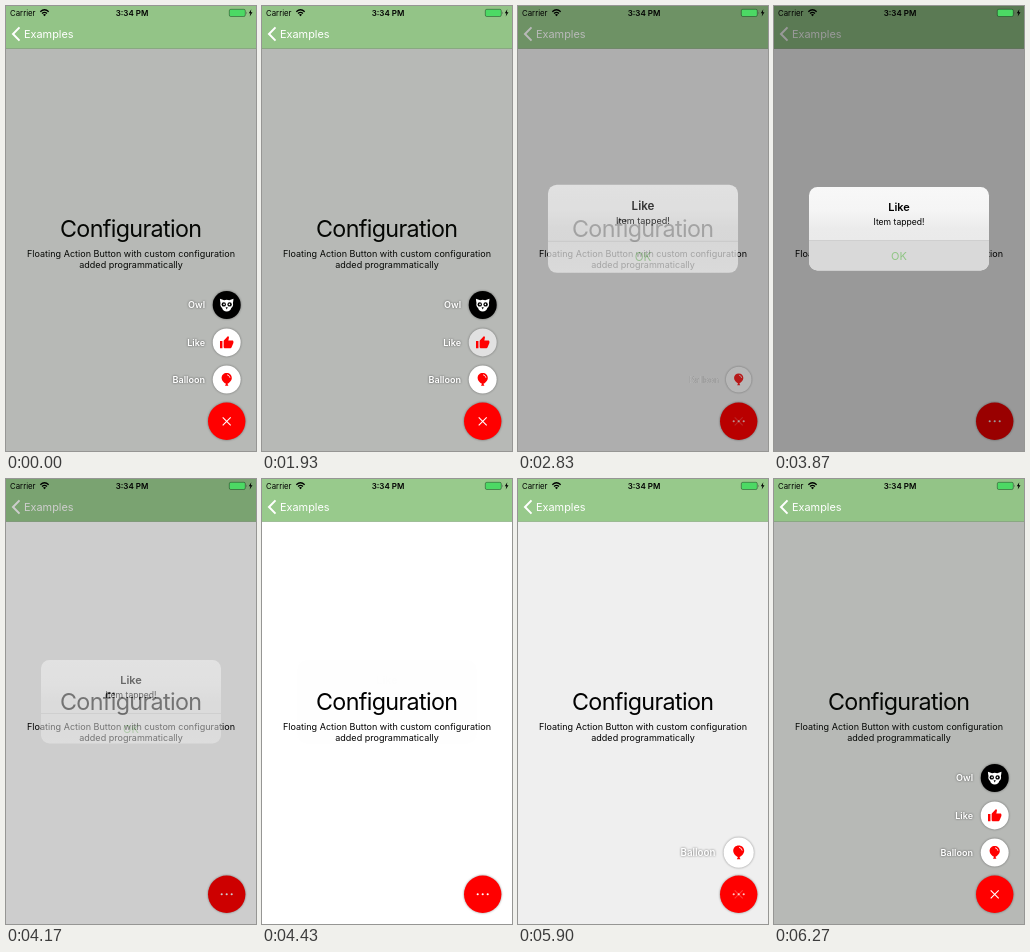
These frames come from a looping animation (250x445 px, 6.33 s). An HTML page:

```html
<!DOCTYPE html>
<html lang="en">
<head>
<meta charset="utf-8">
<title>Floating action button</title>
<style>
  html, body { margin: 0; width: 100%; height: 100%; overflow: hidden; background: #fff; }
  svg { display: block; width: 100%; height: 100%; }
  text { font-family: Inter, Roboto, sans-serif; font-optical-sizing: none; }
  .mid { text-anchor: middle; }
  .lift { filter: drop-shadow(0 .7px 1px rgba(0, 0, 0, .42)); }
  .label { font-size: 9.05px; font-weight: 600; fill: #fff; text-anchor: end;
           filter: drop-shadow(0 .5px .8px rgba(0, 0, 0, .55)); }
</style>
</head>
<body>
<svg viewBox="0 0 250 445" preserveAspectRatio="none">
  <defs>
    <linearGradient id="frost" x1="0" y1="0" x2="0" y2="1">
      <stop offset="0" stop-color="#f8f8f8"/>
      <stop offset=".28" stop-color="#f5f5f5"/>
      <stop offset=".5" stop-color="#ebebeb"/>
      <stop offset=".64" stop-color="#eaeaea"/>
      <stop offset="1" stop-color="#eeeeee"/>
    </linearGradient>
  </defs>

  <rect width="250" height="445" fill="#fff"/>
  <text class="mid" x="124.7" y="231" font-size="23.3" letter-spacing="-.65">Configuration</text>
  <g class="mid" font-size="9.04">
    <text x="125" y="251.2">Floating Action Button with custom configuration</text>
    <text x="125" y="262.3">added programmatically</text>
  </g>

  <rect id="overlay" width="250" height="445" fill="#111a10"/>

  <g id="owl">
    <text class="label" x="-21.7" y="3.2">Owl</text>
    <circle class="lift" r="14" fill="#000"/>
    <path fill="#fff" d="M-6.8-6.2Q-4.5-5.6-2.6-4.8Q0-5.5 2.6-4.8Q4.5-5.6 6.8-6.2Q6.6-3.4 6.2-2Q7 1.2 4.6 3Q3.8 6.4 0 6.6Q-3.8 6.4-4.6 3Q-7 1.2-6.2-2Q-6.6-3.4-6.8-6.2Z"/>
    <g fill="#000">
      <circle cx="-2.9" cy="-.6" r="2.2"/><circle cx="2.9" cy="-.6" r="2.2"/>
      <path d="M-1.1 2.2H1.1L0 4.4Z"/>
    </g>
    <circle cx="-2.7" cy="-.6" r=".8" fill="#fff"/><circle cx="2.7" cy="-.6" r=".8" fill="#fff"/>
  </g>

  <g id="like">
    <text class="label" x="-21.7" y="3.2">Like</text>
    <circle id="likeDisc" class="lift" r="14" fill="#fff"/>
    <path fill="#f00" transform="scale(.61) translate(-12 -11.3)" d="M1 21h4V9H1v12zm22-11c0-1.1-.9-2-2-2h-6.3l1-4.9c0-.4-.2-.8-.5-1.1L14.2 1 7.6 7.6C7.2 8 7 8.500 7 9v10c0 1.100.9 2 2 2h9c.8 0 1.500-.5 1.800-1.200l3-7.100c.1-.2.2-.4.2-.7z"/>
  </g>

  <g id="balloon">
    <text class="label" x="-21.7" y="3.2">Balloon</text>
    <circle class="lift" r="14" fill="#fff"/>
    <path fill="#f00" d="M0-6.6C3-6.6 5.100-4.500 5.100-1.700C5.100 1 2.600 3.300.7 4.200L1.700 6.200H-1.700L-.7 4.200C-2.600 3.300-5.100 1-5.100-1.700C-5.100-4.500-3-6.600 0-6.600Z"/>
    <path fill="none" stroke="#fff" stroke-width=".8" stroke-linecap="round" d="M.7-4.800Q2.900-4.400 3.200-2.200"/>
  </g>

  <g transform="translate(220.700 415.300)">
    <circle id="fab" class="lift" r="18.700" fill="#f00"/>
    <g id="dots" fill="#fff">
      <circle cx="-5" r="1.050"/><circle r="1.050"/><circle cx="5" r="1.050"/>
    </g>
    <path id="cross" stroke="#fff" stroke-width="1.100" d="M-4-4L4 4M4-4L-4 4"/>
  </g>

  <rect id="bar" width="250" height="42.700"/>
  <rect y="42.500" width="250" height=".5" fill="#000" opacity=".25"/>
  <path fill="none" stroke="#fff" stroke-width="2" d="M13.500 21.400L7 28L13.500 34.600"/>
  <text x="18" y="32" font-size="10.900" fill="#fff">Examples</text>

  <rect id="dim" width="250" height="445"/>

  <g id="alert">
    <rect x="35" y="181" width="180" height="83.500" rx="8.500" fill="url(#frost)"/>
    <path id="pressOk" fill="#d9d9d9" d="M35 234.500H215V256A8.500 8.500 0 0 1 206.500 264.500H43.500A8.500 8.500 0 0 1 35 256Z"/>
    <rect x="35" y="234.200" width="180" height=".6" fill="#c4c4c4"/>
    <g class="mid">
      <text x="125" y="205.200" font-size="11" font-weight="600">Like</text>
      <text x="125" y="218.700" font-size="8.600">Item tapped!</text>
      <text x="125" y="253.700" font-size="11" fill="#8fc584">OK</text>
    </g>
  </g>

  <text x="4" y="9.800" font-size="7.800">Carrier</text>
  <g fill="none" stroke="#000" stroke-width="1.300">
    <path d="M34.300 5.700Q38.500 1.900 42.700 5.700M36 7.500Q38.500 5.200 41 7.500"/>
  </g>
  <path d="M37 8.700Q38.500 7.500 40 8.700L38.500 10.300Z"/>
  <text class="mid" x="126" y="9.800" font-size="8" font-weight="600">3:34 PM</text>
  <rect x="223.300" y="3.300" width="16" height="7.200" rx="1.500" fill="#4cd964" stroke="#000" stroke-opacity=".6" stroke-width=".6"/>
  <path fill="#555" d="M240 5.500Q241.300 6.900 240 8.300Z"/>
  <path d="M245.300 3.200L242.800 7.200H244.400L243.700 10.600L246.500 6.200H244.800Z"/>
</svg>

<script>
const LOOP = 6330;
const CLOSE = 2690, OPEN = 5810;
const SHOW = 2726, HIDE = 4096, ALERT_MS = 404;
const $ = id => document.getElementById(id);
const clamp = v => Math.min(1, Math.max(0, v));
const within = (t, a, b) => t >= a && t < b;
const mix = (a, b, k) => a + (b - a) * k;
const set = (id, name, value) => $(id).setAttribute(name, value);
const fade = (id, v) => set(id, "opacity", clamp(v).toFixed(4));

const smooth = (t, start, ms) => {
  const k = clamp((t - start) / ms);
  return k * k * (3 - 2 * k);
};

// Critically damped spring used by the alert
const settle = ms => {
  if (ms <= 0) return 0;
  if (ms >= ALERT_MS) return 1;
  const x = ms * .0228;
  return 1 - (1 + x) * Math.exp(-x);
};

// Underdamped spring used by the menu items
const bounce = ms => {
  if (ms <= 0) return 0;
  if (ms >= 260) return 1;
  const s = ms / 1000;
  return 1 - Math.exp(-23 * s) * (Math.cos(35 * s) + .657 * Math.sin(35 * s));
};

const items = [
  { id: "balloon", y: 373.6, open: OPEN, close: 2795, ms: 150 },
  { id: "like", y: 336.4, open: OPEN + 100, close: CLOSE, ms: 135 },
  { id: "owl", y: 299, open: OPEN + 200, close: CLOSE - 10, ms: 120 }
];

function drawItem({ id, y, open, close, ms }, t) {
  const k = t < OPEN ? 1 - smooth(t, close, ms) : bounce(t - open);
  set(id, "transform", `translate(220.7 ${y}) scale(${mix(.4, 1, k).toFixed(4)})`);
  fade(id, k);
}

function render(t) {
  const menu = t < OPEN ? 1 - smooth(t, CLOSE, 200) : smooth(t, OPEN, 300);
  fade("overlay", .3 * menu);
  set("bar", "fill", `rgb(${mix(152, 147, menu)},${mix(202, 196, menu)},${mix(140, 135, menu)})`);
  fade("cross", menu);
  fade("dots", 1 - menu);
  items.forEach(item => drawItem(item, t));

  set("likeDisc", "fill", within(t, 1930, 2700) ? "#e1e1e1" : "#fff");
  set("fab", "fill", within(t, 5600, 5830) ? "#e60000" : "#f00");
  fade("pressOk", within(t, 3870, 4100) ? 1 : 0);

  const shown = settle(t - SHOW);
  const alpha = shown * (1 - settle(t - HIDE));
  const scale = mix(1.18, 1, shown);
  fade("dim", .4 * alpha);
  fade("alert", alpha);
  set("alert", "transform", `translate(125 222.7) scale(${scale.toFixed(4)}) translate(-125 -222.7)`);
}

const began = performance.now();
function tick() {
  render((performance.now() - began) % LOOP);
  requestAnimationFrame(tick);
}
tick();
</script>
</body>
</html>
```
